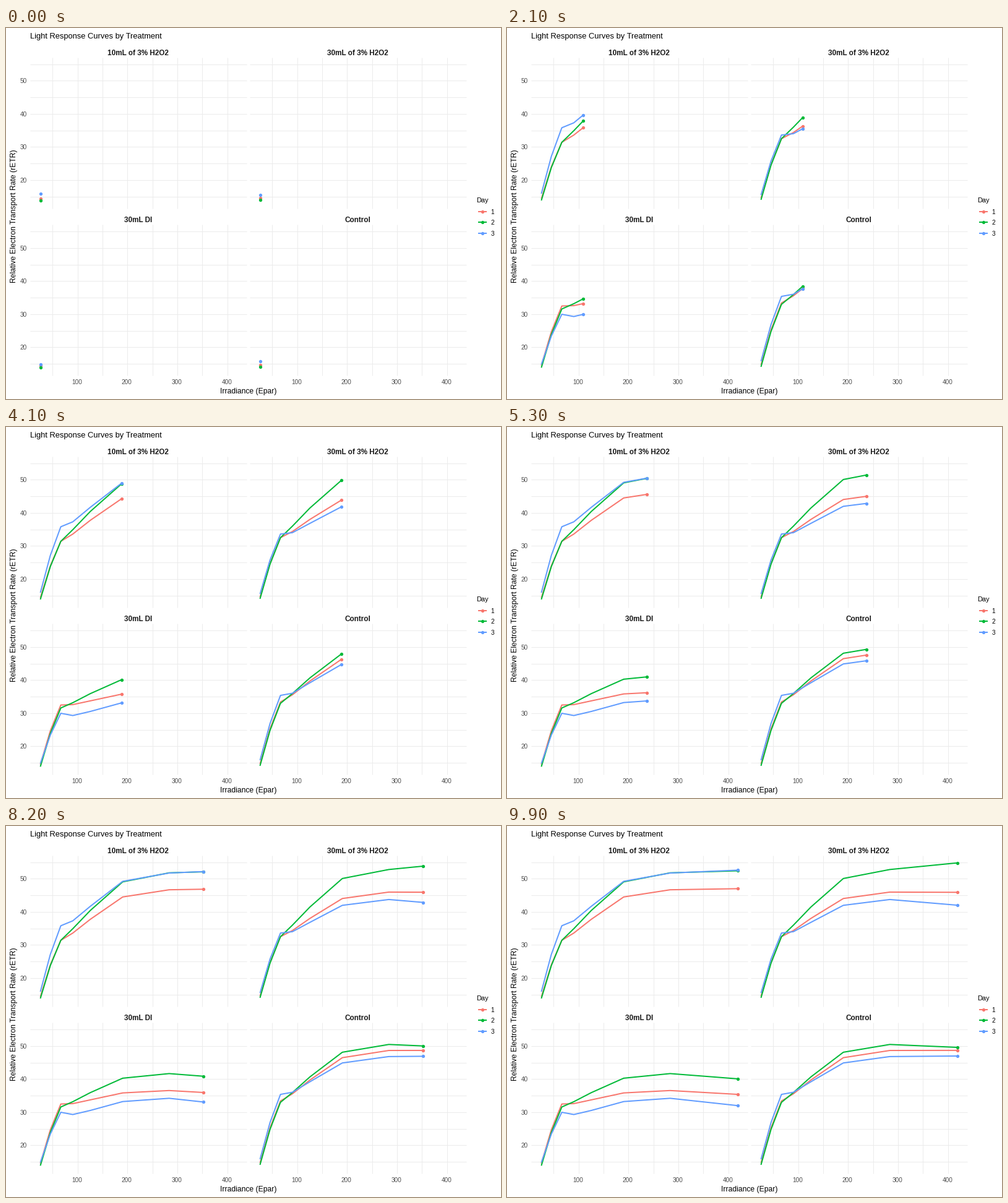
Animation, 800 px wide and 600 px high, one loop 10 s. Source, as a matplotlib script:

```python
import numpy as np
import matplotlib.pyplot as plt
from matplotlib.animation import FuncAnimation

W, H, DPI = 800, 600, 100
PX = 72 / DPI  # points per pixel
FRAMES, INTERVAL = 100, 100

GRID, TICK, STRIP = "#EBEBEB", "#4D4D4D", "#1A1A1A"
PANEL_W, PANEL_H = 350, 244
X_SCALE, Y_SCALE = 0.8067, 5.354  # pixels per data unit

LIGHT = np.array([26, 46, 67, 91, 126, 191, 284, 420])
KNEE, PEAK = 67, 284  # light levels where the curves bend

# Per day: colour, offset of the first reading, dip after the knee
DAYS = [("#F8766D", 8.6, 0.7), ("#00BA38", 8.1, 0.3), ("#619CFF", 9.35, 1.6)]

# Per panel: title, left, top, then rate at knee, peak and end for each day
PANELS = [
    ("10mL of 3% H2O2", 39, 48,
     [(31.3, 46.6, 46.9), (31.3, 51.7, 52.3), (35.7, 51.7, 52.5)]),
    ("30mL of 3% H2O2", 394, 48,
     [(32.4, 45.9, 45.8), (32.4, 52.7, 54.7), (33.5, 43.7, 41.9)]),
    ("30mL DI", 39, 318.6,
     [(32.4, 36.5, 35.3), (31.5, 41.6, 40.0), (29.9, 34.2, 31.9)]),
    ("Control", 394, 318.6,
     [(33.3, 48.6, 48.6), (32.9, 50.4, 49.5), (35.3, 46.8, 46.9)]),
]

plt.rcParams["font.family"] = "Liberation Sans"
fig = plt.figure(figsize=(W / DPI, H / DPI), dpi=DPI, facecolor="white")
ax = fig.add_axes([0, 0, 1, 1])
ax.set_xlim(0, W)
ax.set_ylim(H, 0)
ax.axis("off")


def to_x(light, left):
    return left + 16.5 + (light - LIGHT[0]) * X_SCALE


def to_y(rate, top):
    return top + 10 + (55 - rate) * Y_SCALE


def response(knee, peak, end, offset, dip):
    """Rates at all light levels: steep rise, slow saturation, linear tail."""
    start = offset + 0.18 * knee
    s = np.clip((LIGHT - KNEE) / (PEAK - KNEE), 0, 1)
    rise = s + s * (1 - s) * (0.65 + s)
    sag = s / 0.17 * np.exp(1 - s / 0.17)
    rate = knee + (peak - knee) * rise - dip * sag
    rate[:2] = start, start + 0.565 * (knee - start)
    rate[-1] = end
    return rate


def label(x, y, text, size, color="black", ha="center", **kw):
    ax.text(x, y, text, fontsize=size * PX, color=color, ha=ha,
            va="baseline", **kw)


def stroke(xs, ys, color, width, z):
    return ax.plot(xs, ys, color=color, lw=width * PX, zorder=z,
                   solid_capstyle="butt", solid_joinstyle="round")[0]


def dot_at(xs, ys, color):
    return ax.plot(xs, ys, "o", ms=5.3 * PX, mew=0, color=color, zorder=4)[0]


def draw_panel(name, left, top):
    label(left + PANEL_W / 2 - 0.5, top - 4.5, name, 11.75, STRIP,
          weight="bold")
    for light in range(50, 401, 50):
        x = int(to_x(light, left)) + 0.5
        stroke([x, x], [int(top), int(top) + PANEL_H], GRID, 1, 1)
        if light % 100 == 0 and top > 100:
            label(x - 0.5, 576.5, str(light), 10, TICK)
    for rate in range(15, 56, 5):
        y = int(to_y(rate, top)) + 0.5
        stroke([left, left + PANEL_W], [y, y], GRID, 1, 1)
        if rate % 10 == 0 and left < 100:
            label(34, y + 4.5, str(rate), 10, TICK, ha="right")


def draw_legend():
    label(760.5, 282, "Day", 11, ha="left")
    for i, (color, *_) in enumerate(DAYS):
        y = 296.5 + 17.5 * i
        stroke([763, 777], [y, y], color, 2, 3)
        dot_at([769.5], [y], color)
        label(783.5, y + 4.5, str(i + 1), 10, ha="left")


label(39, 17, "Light Response Curves by Treatment", 12.85, ha="left")
label(392, 591, "Irradiance (Epar)", 12.1)
label(16, 304.5, "Relative Electron Transport Rate (rETR)", 12.1,
      rotation=90, rotation_mode="anchor")
draw_legend()

curves = []
for name, left, top, rates in PANELS:
    draw_panel(name, left, top)
    for (color, offset, dip), keys in zip(DAYS, rates):
        xs = to_x(LIGHT, left)
        ys = to_y(response(*keys, offset, dip), top)
        curves.append((xs, ys, stroke([], [], color, 2, 3),
                       dot_at([], [], color)))


def update(frame):
    t = frame / (FRAMES - 1)
    artists = []
    for xs, ys, line, dot in curves:
        tip_x = xs[0] + t * (xs[-1] - xs[0])
        tip_y = np.interp(tip_x, xs, ys)
        seen = xs < tip_x
        line.set_data(np.append(xs[seen], tip_x), np.append(ys[seen], tip_y))
        dot.set_data([tip_x], [tip_y])
        artists += [line, dot]
    return artists


anim = FuncAnimation(fig, update, frames=FRAMES, interval=INTERVAL,
                     repeat=True, repeat_delay=0, blit=False)
plt.show()
```
